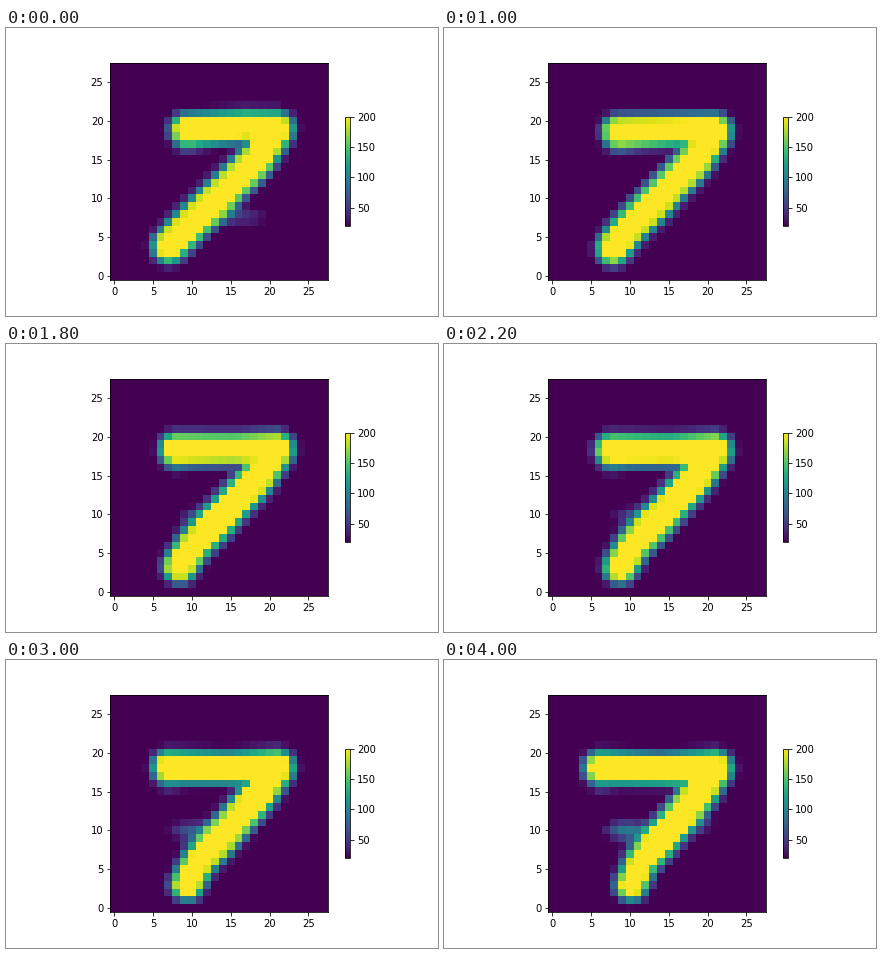
A matplotlib script that plays this animation: 432x288 px, repeating every 4200 ms.

```python
import matplotlib.pyplot as plt
import numpy as np
from matplotlib.animation import FuncAnimation

SIZE, FRAMES, INTERVAL = 28, 21, 200
SOFTNESS = 0.5
X, Y = np.meshgrid(np.arange(SIZE), np.arange(SIZE))

# The seven's skeleton from bar tip to foot: (x, y, stroke radius).
START = np.array([(9.4, 18.8, 1.9), (17, 19.25, 1.8), (20.8, 18.9, 2.1),
                  (18.4, 15, 2.1), (13.3, 10, 2.1), (9.2, 6, 2.1), (7.1, 3.9, 2.0)])
END = np.array([(6.2, 18.0, 1.9), (14, 17.75, 1.8), (20.9, 17.9, 2.1),
                (19.1, 15, 2.1), (15.0, 10, 2.1), (11.5, 6, 1.9), (10.2, 2.9, 1.8)])


def edge_distance(a, b):
    """Signed distance to the edge of a tapered stroke from a to b."""
    dx, dy = b[:2] - a[:2]
    u = ((X - a[0]) * dx + (Y - a[1]) * dy) / (dx * dx + dy * dy)
    u = np.clip(u, 0, 1)
    gap = np.hypot(X - a[0] - u * dx, Y - a[1] - u * dy)
    return gap - (a[2] + u * (b[2] - a[2]))


def blob(x, y, width, height, strength):
    return strength * np.exp(-((X - x) / width) ** 2 / 2 - ((Y - y) / height) ** 2 / 2)


def digit(step):
    # Sideways drift is steady; the vertical move settles early.
    drift = step / (FRAMES - 1)
    settle = 1 - np.exp(-(step / 10) ** 1.5)
    path = START + (END - START) * [drift, settle, drift]
    edge = np.min([edge_distance(a, b) for a, b in zip(path, path[1:])], axis=0)
    image = 255 / (1 + np.exp(edge / SOFTNESS))

    # Faint smudges: fading tail, growing crossbar, shade below the bar tip.
    tip_x, tip_y, _ = path[0]
    image += blob(17, 7.6, 2.4, 0.8, 45 * np.exp(-step / 2))
    image += blob(9.4, 10, 1.8, 0.95, 90 * max(0, drift - 0.25) / 0.75)
    image += blob(19.5, 10.6, 1.7, 0.8, 30 * max(0, drift - 0.75) / 0.25)
    image += blob(tip_x, tip_y - 2.8, 1.2, 0.6, 20)
    return image


fig = plt.figure(figsize=(6, 4), dpi=72, facecolor="white")
fig.subplots_adjust(left=0.125, right=0.9, bottom=0.125, top=0.88)
ax = fig.add_subplot()
picture = ax.imshow(digit(0), origin="lower", cmap="viridis",
                    vmin=20, vmax=200, interpolation="nearest")
ax.set_xticks(range(0, 26, 5))
ax.set_yticks(range(0, 26, 5))
fig.colorbar(picture, ax=ax, shrink=0.5, ticks=range(50, 201, 50))


def update(step):
    picture.set_data(digit(step))
    return [picture]


animation = FuncAnimation(fig, update, frames=FRAMES, interval=INTERVAL,
                          repeat=True, repeat_delay=0)
plt.show()
```
